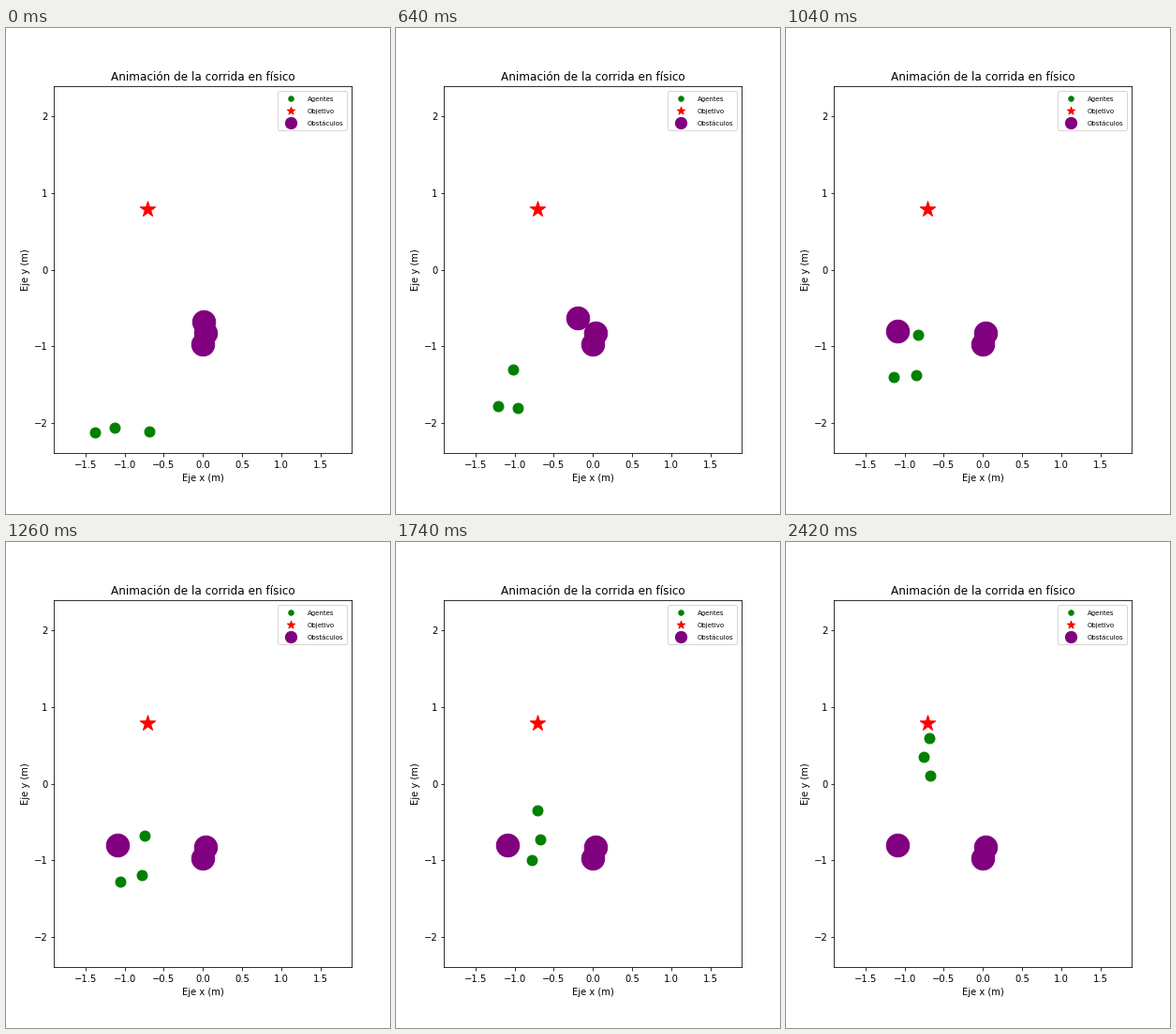
Animation, 410 px wide and 518 px high, one loop 2440 ms. Source, as a matplotlib script:

```python
import numpy as np
import matplotlib.pyplot as plt
from matplotlib.animation import FuncAnimation

W, H, DPI = 410, 518, 72
FRAMES, STEP = 122, 20
XLIM, YLIM = 1.9, 2.4
LEFT, RIGHT, BOTTOM, TOP = 51.3, 369.36, 64.8, 456.19

# Stage points that each agent passes at equal intervals
ROUTES = np.array([
    [(95, 431), (108, 425), (110.5, 387), (120, 364), (139, 351), (156, 305), (154, 249)],
    [(116, 426), (119, 391), (130, 346), (147, 316), (150, 297), (152, 256), (153, 209)],
    [(153, 430), (130, 427), (133.5, 387), (143.5, 358), (152.5, 330), (154, 283), (147, 229)],
])
TANGENTS = np.gradient(ROUTES, axis=1)

OBSTACLES = np.array([(211, 313.3), (213, 325), (210, 337)])
CARRY_START, CARRY_END = 580, 800
CARRY_SHIFT, CARRY_LIFT = np.array([-92, 9.7]), 12


def to_data(points):
    """Stage pixels (from the top left) to axis units."""
    px, py = np.asarray(points, float).T
    x = (px - (LEFT + RIGHT) / 2) * 2 * XLIM / (RIGHT - LEFT)
    y = (H - py - (BOTTOM + TOP) / 2) * 2 * YLIM / (TOP - BOTTOM)
    return np.column_stack([x, y])


def smoothstep(u):
    u = np.clip(u, 0, 1)
    return u * u * (3 - 2 * u)


def agents_at(progress):
    """Smooth cubic through the route points, progress from 0 to 1."""
    legs = ROUTES.shape[1] - 1
    i = min(int(progress * legs), legs - 1)
    u = progress * legs - i
    blend = smoothstep(u)
    return (ROUTES[:, i] * (1 - blend) + ROUTES[:, i + 1] * blend
            + TANGENTS[:, i] * u * (1 - u) ** 2
            - TANGENTS[:, i + 1] * u ** 2 * (1 - u))


def obstacles_at(t):
    """The upper obstacle is lifted and carried to the left."""
    u = smoothstep((t - CARRY_START) / (CARRY_END - CARRY_START))
    points = OBSTACLES.copy()
    points[0] += CARRY_SHIFT * u
    points[0, 1] -= CARRY_LIFT * np.sin(np.pi * u)
    return points


plt.rcParams["font.family"] = "DejaVu Sans"
plt.rcParams["font.size"] = 10
fig, ax = plt.subplots(figsize=(W / DPI, H / DPI), dpi=DPI)
fig.subplots_adjust(left=LEFT / W, right=RIGHT / W, bottom=BOTTOM / H, top=TOP / H)


def dots(points, **style):
    return ax.scatter(*to_data(points).T, **style)


agents = dots(agents_at(0), s=120, color="green", label="Agentes")
dots([(151.3, 193.3)], s=300, marker="*", color="red", label="Objetivo")
obstacles = dots(obstacles_at(0), s=600, color="purple", label="Obstáculos")

ax.set_xlim(-XLIM, XLIM)
ax.set_ylim(-YLIM, YLIM)
ax.set_xticks(np.arange(-1.5, 1.6, 0.5))
ax.set_yticks(range(-2, 3))
ax.tick_params(axis="x", pad=3.9)
ax.set_xlabel("Eje x (m)")
ax.set_ylabel("Eje y (m)")
ax.set_title("Animación de la corrida en físico", fontsize=12)
legend = ax.legend(loc="upper right", markerscale=0.5, fontsize=10)
for label in legend.get_texts():
    label.set_fontsize(7)


def update(frame):
    agents.set_offsets(to_data(agents_at(frame / (FRAMES - 1))))
    obstacles.set_offsets(to_data(obstacles_at(frame * STEP)))
    return agents, obstacles


anim = FuncAnimation(fig, update, frames=FRAMES, interval=STEP,
                     repeat=True, repeat_delay=0, blit=False)
plt.show()
```
